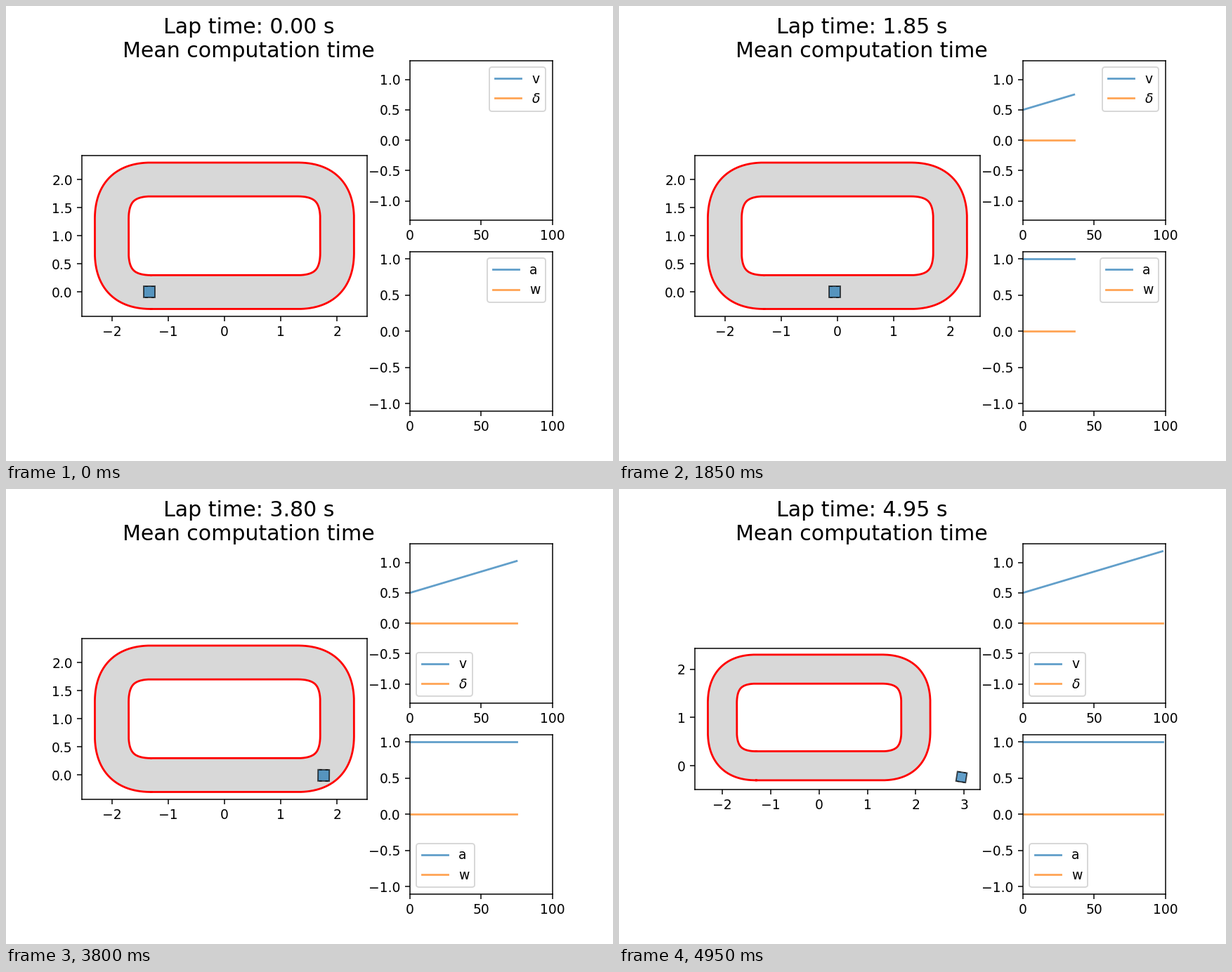
These frames come from a looping animation (864x648 px, 5000 ms). A matplotlib script:

```python
import numpy as np
import matplotlib.pyplot as plt
from matplotlib.animation import FuncAnimation
from matplotlib.patches import Polygon

FRAMES, DT = 100, 0.05
HALF_WIDTH = 0.3
BLUE, ORANGE = "tab:blue", "tab:orange"


def centerline():
    """Closed rectangle (4 x 2) whose corners are quadratic Bezier arcs."""
    corners = np.array([(2, 0), (2, 2), (-2, 2), (-2, 0)], float)
    u = np.linspace(0, 1, 60)[:, None]
    points, normals = [], []
    for i, corner in enumerate(corners):
        into = corner - corners[i - 1]
        out = corners[(i + 1) % 4] - corner
        into, out = into / np.hypot(*into), out / np.hypot(*out)
        start, end = corner - 0.7 * into, corner + 0.7 * out
        points.append((1 - u) ** 2 * start + 2 * u * (1 - u) * corner + u ** 2 * end)
        tangent = (1 - u) * into + u * out
        tangent /= np.hypot(tangent[:, 0], tangent[:, 1])[:, None]
        normals.append(np.column_stack([-tangent[:, 1], tangent[:, 0]]))
    points, normals = np.vstack(points), np.vstack(normals)
    # start and finish at the end of the last corner
    return np.vstack([points[-1:], points]), np.vstack([normals[-1:], normals])


def box(cx, cy, length, width):
    corners = np.array([(-1, -1), (1, -1), (1, 1), (-1, 1)])
    return corners * (length / 2, width / 2) + (cx, cy)


def pose(t):
    """Car position and heading: straight run, then drifting off the bend."""
    late = max(t - 2.85, 0)
    x = -1.328 + 1.097 * (0.5 * t + 0.07 * t ** 2) - late ** 2 * (0.150 - 0.0365 * late)
    turn = np.clip(t - 3.65, 0, 0.5)
    y = -0.222 * (turn ** 2 + max(t - 4.15, 0))
    angle = np.radians(np.interp(t, [3.75, 4.4, 4.95], [0, -7.5, -9]))
    return np.array([x, y]), angle


fig = plt.figure(figsize=(6.4, 4.8), dpi=135)
grid = fig.add_gridspec(2, 2, width_ratios=[2, 1])
track = fig.add_subplot(grid[:, 0])
state_ax = fig.add_subplot(grid[0, 1])
input_ax = fig.add_subplot(grid[1, 1])
title = fig.text(0.4, 0.975, "", fontsize=16, ha="center", va="top")

# track
track.set_aspect("equal")
mid, normal = centerline()
outer, inner = mid - HALF_WIDTH * normal, mid + HALF_WIDTH * normal
track.fill(*np.vstack([outer, inner[::-1]]).T, color="#d8d8d8", lw=0)
for edge in (outer, inner):
    track.plot(*edge.T, color="red", lw=1.5)

# car
body = box(0, 0, 0.2, 0.2)
wheels = [box(x, y, 0.05, 0.02) for x in (-0.055, 0.055) for y in (-0.1, 0.1)]
shapes = [body] + wheels
car = [Polygon(body, facecolor=BLUE, edgecolor="black", lw=1, alpha=0.7, zorder=3)]
car += [Polygon(w, facecolor="black", lw=0, alpha=0.7, zorder=3.1) for w in wheels]
for part in car:
    track.add_patch(part)

# signals
steps = np.arange(FRAMES)
speed = 0.5 + 0.007 * steps
zero, one = np.zeros(FRAMES), np.ones(FRAMES)
curves = []


def signal_plot(ax, signals):
    for (label, values), color in zip(signals, (BLUE, ORANGE)):
        line, = ax.plot([], [], color=color, alpha=0.7, label=label)
        curves.append((line, values))
    top = 1.1 * signals[0][1].max()
    ax.set_xlim(0, 100)
    ax.set_ylim(-top, top)
    ax.legend(loc="best")


signal_plot(state_ax, [("v", speed), (r"$\delta$", zero)])
signal_plot(input_ax, [("a", one), ("w", zero)])


def draw(i):
    t = i * DT
    title.set_text(f"Lap time: {t:.2f} s\nMean computation time")

    center, angle = pose(t)
    c, s = np.cos(angle), np.sin(angle)
    placed = [shape @ np.array([[c, s], [-s, c]]) + center for shape in shapes]
    for part, xy in zip(car, placed):
        part.set_xy(xy)

    # the view grows to keep the car inside, with 5 % margins
    corners = np.vstack(placed)
    right = max(2.3, corners[:, 0].max())
    low = min(-0.3, corners[:, 1].min())
    mx, my = 0.05 * (right + 2.3), 0.05 * (2.3 - low)
    track.set_xlim(-2.3 - mx, right + mx)
    track.set_ylim(low - my, 2.3 + my)

    for line, values in curves:
        line.set_data(steps[:i], values[:i])
    return [title, *car, *(line for line, _ in curves)]


anim = FuncAnimation(fig, draw, frames=FRAMES, init_func=lambda: draw(0),
                     interval=1000 * DT, repeat=True, blit=False)
plt.show()
```
